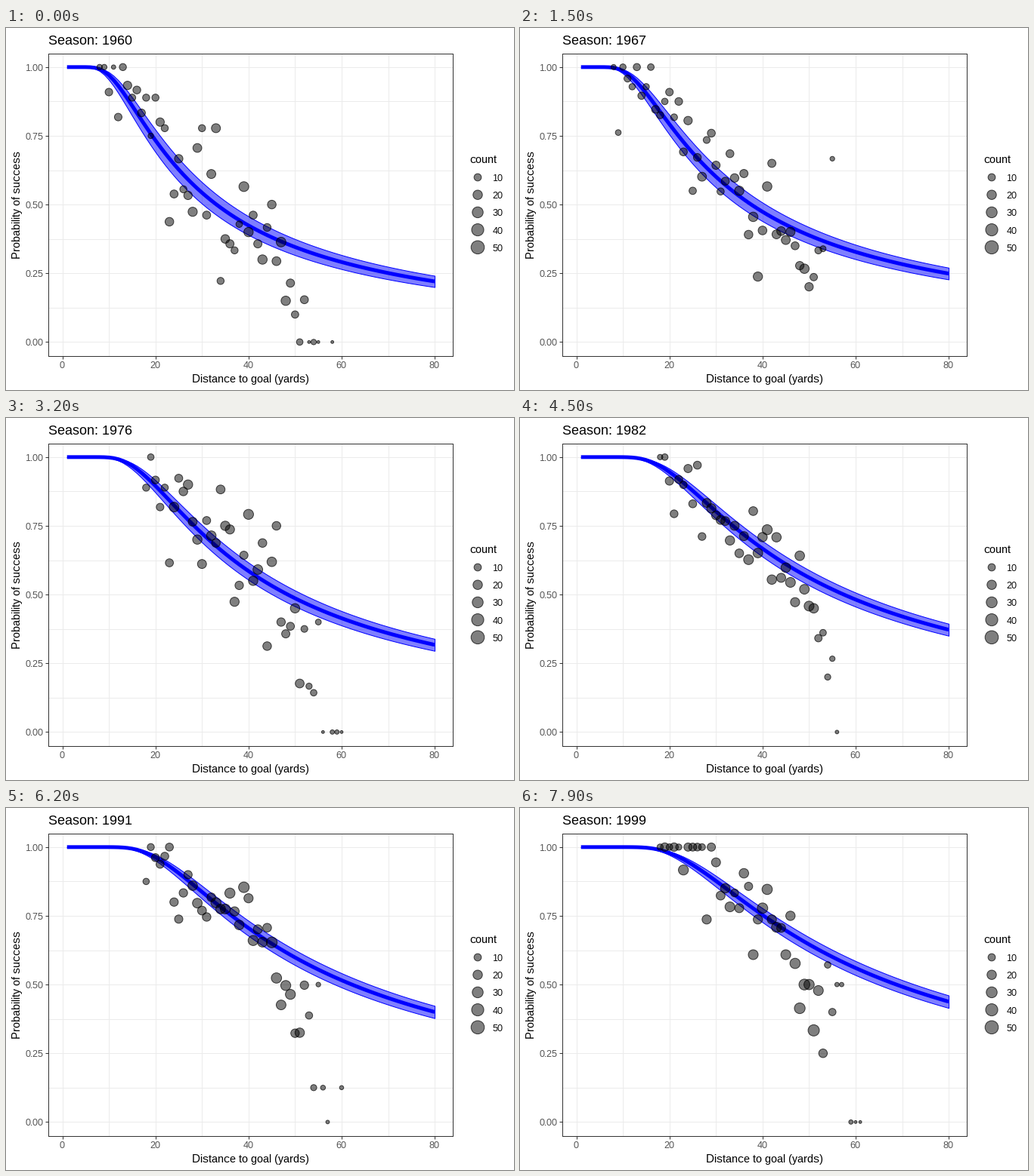
Animation of 672x480 px, one loop 8000 ms. Source, as a matplotlib script:

```python
import math

import matplotlib.pyplot as plt
import numpy as np
from matplotlib.animation import FuncAnimation

W, H, DPI = 672, 480, 96
PT = 72 / DPI                     # points per pixel
FRAMES, STEP = 80, 100
SEASONS = 40
MOVED_BACK = 14                   # first season with the goal farther away
GOAL = 3.083                      # half width of the goal in yards
PANEL = (56.4, 33.6, 591.4, 434.6)
DIST = np.arange(81)
YARDS = DIST[1:]
GREY = "#4d4d4d"

plt.rcParams.update({"font.family": "Liberation Sans",
                     "text.hinting": "native", "text.hinting_factor": 1})


# ---- model curve ----
def success(yards, skill):
    """Chance that the kick angle stays inside the posts."""
    z = skill * np.arctan(GOAL / yards) / GOAL
    return np.array([math.erf(v / math.sqrt(2)) for v in z])


def skill_at(frame):
    return np.interp(frame, [0, 22, 32, 45, 62, 79],
                     [22.4, 26.8, 32.7, 38.8, 42.0, 46.4])


def spread_at(frame):
    return (2.15 + 0.007 * frame) * np.interp(YARDS, [1, 80], [0.85, 1])


# ---- kicks per season ----
def diameter(tries):
    return 3.79 + 14.2 * np.sqrt(np.maximum(tries - 1, 0) / 52)


def simulate(k):
    """Seeded season: success rate and dot size per distance, NaN if no kick."""
    rng = np.random.default_rng(1960 + k)
    first = 8 if k < MOVED_BACK else 18
    d = np.arange(first, 62)
    level = (4 + 0.32 * d) * (1 + 0.01 * k) * np.clip((d - first + 3) / 6, 0, 1)
    reach = 1 / (1 + np.exp((d - 51 - 0.05 * k) / 1.3))
    tried = rng.poisson(level * reach + 0.7 * (d > 52))
    chance = success(d, skill_at(2 * k)) * (1 - 0.045 * np.maximum(d - 44, 0))
    made = rng.binomial(tried, chance)
    seen = tried > 0
    rate, size = np.full(81, np.nan), np.full(81, np.nan)
    rate[d[seen]] = made[seen] / tried[seen]
    size[d[seen]] = diameter(tried[seen])
    return rate, size


states = [simulate(k) for k in range(SEASONS)]
marks = [round(k * 99 / 49) for k in range(SEASONS)]


def kicks(frame):
    """Season at this frame; only distances in both neighbours are tweened."""
    if frame in marks:
        return states[marks.index(frame)]
    k = int(np.searchsorted(marks, frame))
    t = (frame - marks[k - 1]) / (marks[k] - marks[k - 1])
    return tuple(a + (b - a) * t for a, b in zip(states[k - 1], states[k]))


# ---- stage ----
fig = plt.figure(figsize=(W / DPI, H / DPI), dpi=DPI, facecolor="white")
left, top, right, bottom = PANEL
ax = fig.add_axes([left / W, 1 - bottom / H, (right - left) / W, (bottom - top) / H])
ax.set(xlim=(-2.95, 83.95), ylim=(-0.05, 1.05))
page = fig.add_axes([0, 0, 1, 1])
page.set(xlim=(0, W), ylim=(H, 0))
page.axis("off")


def label(x, y, text, size, color="black", ha="left", **kw):
    return page.text(x, y, text, fontsize=size, color=color, ha=ha,
                     va="baseline", **kw)


def dots(axes, x, y, d):
    return axes.scatter(x, y, s=(np.asarray(d) * PT) ** 2, facecolor=(0, 0, 0, 0.5),
                        edgecolor=(0, 0, 0, 0.7), linewidth=PT, zorder=5)


for v in range(0, 81, 10):
    ax.axvline(v, color="#ebebeb", lw=PT, zorder=0)
for v in np.arange(0, 1.01, 0.125):
    ax.axhline(v, color="#ebebeb", lw=PT, zorder=0)
for spine in ax.spines.values():
    spine.set(color="#333333", linewidth=PT, zorder=9)

x_ticks, y_ticks = np.arange(0, 81, 20), np.arange(0, 1.01, 0.25)
ax.set(xticks=x_ticks, yticks=y_ticks)
ax.tick_params(length=2.75, width=PT, color="#333333",
               labelbottom=False, labelleft=False)
for v in x_ticks:
    x = left + (v + 2.95) / 86.9 * (right - left)
    label(x - 0.6, 451, str(v), 8.8, GREY, "center")
for v in y_ticks:
    y = bottom - (v + 0.05) / 1.1 * (bottom - top)
    label(49.5, y + 4.7, f"{v:.2f}", 8.8, GREY, "right")

label(324, 470, "Distance to goal (yards)", 11, ha="center")
label(19.5, 234, "Probability of success", 11, ha="center",
      rotation=90, rotation_mode="anchor")
title = label(56.5, 22, "", 13.2)

label(613, 179, "count", 11)
counts = np.arange(10, 51, 10)
legend_y = 198 + 23.2 * np.arange(5)
dots(page, np.full(5, 624), legend_y, diameter(counts))
for n, y in zip(counts, legend_y):
    label(643.5, y + 5, str(n), 8.8)

band = ax.fill_between(YARDS, 0, 1, facecolor=(0, 0, 1, 0.5),
                       edgecolor="blue", linewidth=PT, zorder=2)
curve, = ax.plot([], [], color="blue", lw=5 * PT, solid_capstyle="butt", zorder=4)
points = dots(ax, [], [], [])


def draw(frame):
    title.set_text(f"Season: {1960 + frame // 2}")
    skill, spread = skill_at(frame), spread_at(frame)
    low, high = success(YARDS, skill - spread), success(YARDS, skill + spread)
    band.set_verts([np.r_[np.c_[YARDS, high], np.c_[YARDS, low][::-1]]])
    curve.set_data(YARDS, success(YARDS, skill))
    rate, size = kicks(frame)
    seen = ~np.isnan(rate)
    points.set_offsets(np.c_[DIST[seen], rate[seen]])
    points.set_sizes((size[seen] * PT) ** 2)
    return [title, band, curve, points]


anim = FuncAnimation(fig, draw, frames=FRAMES, interval=STEP, repeat=True,
                     repeat_delay=0, blit=False)
plt.show()
```
